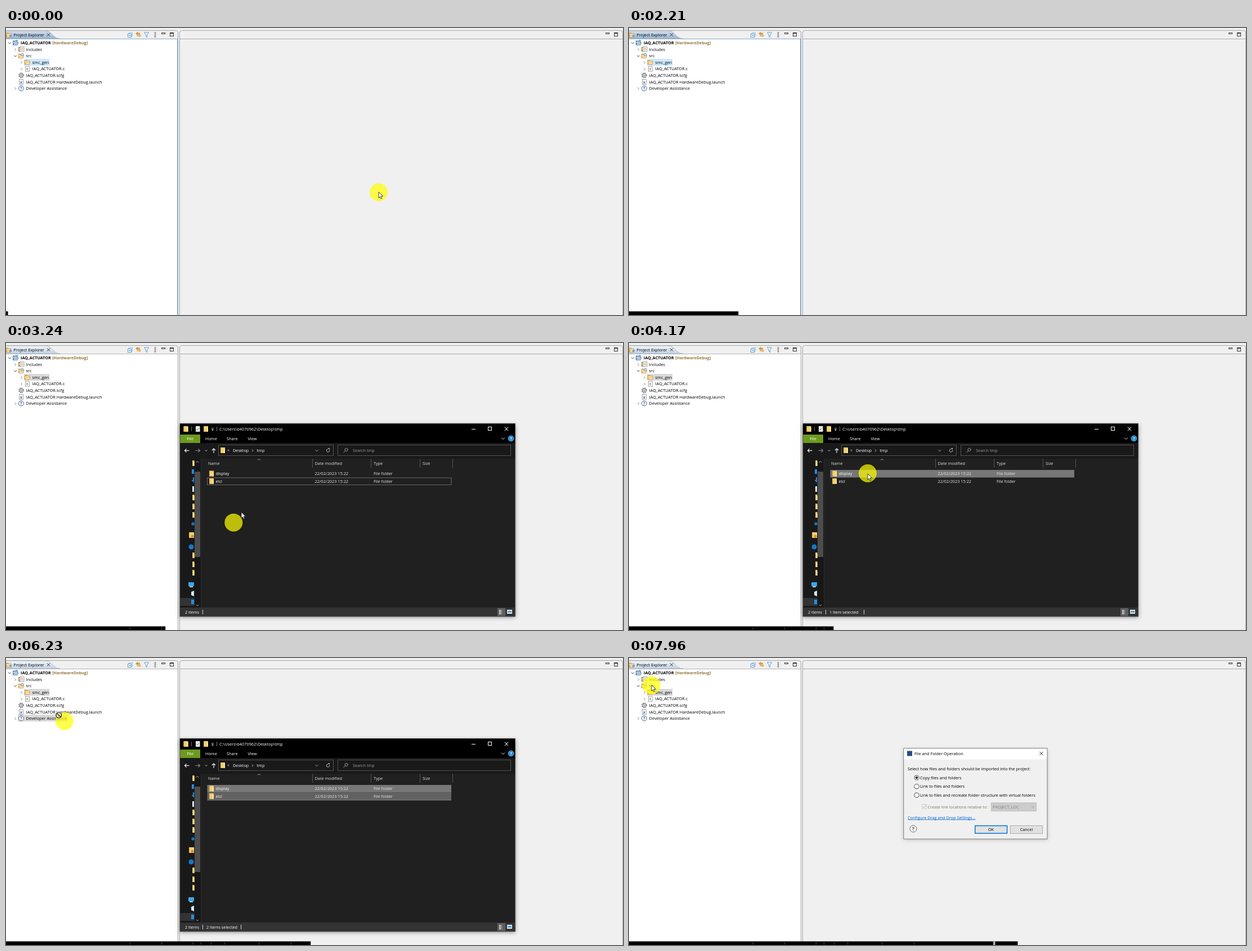
Write an HTML page with a canvas that moves like this. It is 1096x511 px and loops after 7990 ms.

```html
<!DOCTYPE html>
<html lang="en">
<head>
<meta charset="utf-8">
<title>Import folders into a project</title>
<style>
html, body { margin: 0; width: 100%; height: 100%; overflow: hidden; background: #f0f0f0; }
canvas { display: block; width: 1096px; height: 511px; }
</style>
</head>
<body>
<canvas id="stage"></canvas>
<script>
const W = 1096, H = 511, LOOP = 7990;
const FONT = '"Open Sans", "Noto Sans", sans-serif';
const TEXT_SIZE = 7.33, BOLD_SIZE = 7.2;
const WINDOW_FRAME = 2390, WINDOW_READY = 2480;
const PICK_FIRST = 3850, PICK_BOTH = 4500;
const DRAG_START = 5300, DIALOG_OPEN = 7520;
const HALO_LAG = 50;

// pointer path: time, x, y
const PATH = [
  [0, 662, 292.5], [700, 662, 292.5], [780, 638, 293], [1000, 560, 314],
  [1280, 412, 382], [1330, 395, 393], [1480, 330, 430], [1680, 235, 492], [1800, 190, 545],
  [2550, 300, 545], [2800, 345, 470], [3030, 384, 382], [3190, 404, 320], [3240, 418, 302],
  [3450, 424, 262], [3620, 424, 232], [4150, 424, 232], [4350, 424, 245], [4800, 424, 245],
  [5120, 424, 239], [5170, 427, 234], [5400, 425, 232], [5770, 357, 172], [5920, 272, 180],
  [6060, 190, 142], [6180, 104, 112.5], [6230, 93, 101], [6380, 50, 73], [6550, 38, 62],
  [6750, 40, 54], [6900, 40, 48.5]
];

const canvas = document.getElementById('stage');
const ctx = canvas.getContext('2d');
const ratio = window.devicePixelRatio || 1;
canvas.width = W * ratio;
canvas.height = H * ratio;

function pointerAt(t) {
  if (t <= 0) return { x: PATH[0][1], y: PATH[0][2] };
  const i = PATH.findIndex(p => p[0] > t);
  if (i < 0) {
    const end = PATH[PATH.length - 1];
    return { x: end[1], y: end[2] };
  }
  const [t0, x0, y0] = PATH[i - 1], [t1, x1, y1] = PATH[i];
  const k = (t - t0) / (t1 - t0);
  return { x: x0 + (x1 - x0) * k, y: y0 + (y1 - y0) * k };
}

function rect(x, y, w, h, color) {
  ctx.fillStyle = color;
  ctx.fillRect(x, y, w, h);
}

function frame(x, y, w, h, color, width = 1) {
  ctx.strokeStyle = color;
  ctx.lineWidth = width;
  ctx.strokeRect(x, y, w, h);
}

function line(color, width, ...p) {
  ctx.strokeStyle = color;
  ctx.lineWidth = width;
  ctx.beginPath();
  for (let i = 0; i < p.length; i += 2) ctx.lineTo(p[i], p[i + 1]);
  ctx.stroke();
}

function poly(color, ...p) {
  ctx.fillStyle = color;
  ctx.beginPath();
  for (let i = 0; i < p.length; i += 2) ctx.lineTo(p[i], p[i + 1]);
  ctx.closePath();
  ctx.fill();
}

function disc(x, y, r, fill, stroke, width = 1) {
  ctx.beginPath();
  ctx.arc(x, y, r, 0, Math.PI * 2);
  if (fill) { ctx.fillStyle = fill; ctx.fill(); }
  if (stroke) { ctx.strokeStyle = stroke; ctx.lineWidth = width; ctx.stroke(); }
}

// text is placed by its left edge and middle line
function text(str, x, y, color = '#000', weight = 400, size = weight > 400 ? BOLD_SIZE : TEXT_SIZE) {
  ctx.font = `${weight} ${size}px ${FONT}`;
  ctx.fillStyle = color;
  ctx.fillText(str, x, y + 2.6);
  return ctx.measureText(str).width;
}

function centered(str, x, y, color, weight, size) {
  ctx.textAlign = 'center';
  text(str, x, y, color, weight, size);
  ctx.textAlign = 'left';
}

function vertical(y0, y1, top, bottom) {
  const g = ctx.createLinearGradient(0, y0, 0, y1);
  g.addColorStop(0, top);
  g.addColorStop(1, bottom);
  return g;
}

function chevron(x, y, open, color = '#444', s = 2.3) {
  if (open) line(color, 1, x - s, y - s / 2, x, y + s / 2, x + s, y - s / 2);
  else line(color, 1, x - s / 2, y - s, x + s / 2, y, x - s / 2, y + s);
}

function cross(x, y, s, color) {
  line(color, 1, x - s, y - s, x + s, y + s);
  line(color, 1, x + s, y - s, x - s, y + s);
}

function minMax(x, y) {
  frame(x + .5, y + .5, 6, 2, '#444');
  frame(x + 15.5, y + .5, 6, 6, '#333');
  rect(x + 15, y, 7, 2, '#333');
}

function shadowBox(x, y, w, h, color, strength) {
  ctx.save();
  ctx.shadowColor = `rgba(0,0,0,${strength})`;
  ctx.shadowBlur = 7;
  ctx.shadowOffsetY = 1.5;
  rect(x, y, w, h, color);
  ctx.restore();
}

function openFolder(x, y, edge = '#d09a45', fill = '#fde6a8') {
  poly(edge, x - 5, y - 4, x - 1, y - 4, x, y - 3, x + 4, y - 3, x + 4, y + 4, x - 5, y + 4);
  rect(x - 4, y - 2, 7, 4, '#fff6dc');
  poly(edge, x - 5, y + 4, x - 3, y - .5, x + 5.5, y - .5, x + 3.5, y + 4);
  poly(fill, x - 3.7, y + 3.3, x - 2.4, y + .2, x + 4.4, y + .2, x + 3.1, y + 3.3);
}

function page(x, y, letter, color) {
  rect(x - 3.5, y - 4.5, 7, 9, '#fff');
  frame(x - 3.5, y - 4.5, 7, 9, '#8a8f98', .8);
  centered(letter, x, y, color, 700, 6.5);
}

const ICONS = {
  project(x, y) {
    openFolder(x, y, '#4d7fae', '#b9d6f0');
    rect(x, y - 5, 4, 3, '#6c9cc9');
  },
  includes(x, y) {
    openFolder(x, y, '#a98a55', '#f2dfb4');
    page(x + 1.5, y - .5, '', '#777');
    for (let i = 0; i < 3; i++) line('#b8924a', .8, x - .5, y - 2.5 + i * 2, x + 3.5, y - 2.5 + i * 2);
  },
  source(x, y) {
    openFolder(x, y);
    disc(x + 2, y - 2, 2.3, '#cfe0f4', '#4c78ae', .8);
  },
  folder(x, y) { openFolder(x, y); },
  code(x, y) { page(x, y, 'c', '#8a6327'); },
  gear(x, y) {
    ctx.setLineDash([1.7, 1.7]);
    disc(x, y, 4.3, null, '#777', 1.5);
    ctx.setLineDash([]);
    disc(x, y, 3.3, '#e5e5e5', '#777', 1);
    disc(x, y, 1.3, '#fff', '#777', .8);
  },
  launch(x, y) { page(x, y, 'x', '#355f94'); },
  help(x, y) {
    disc(x, y, 4.5, '#fff', '#3b5d8c', 1);
    centered('?', x, y, '#2f4f80', 700, 7);
  }
};

// icon, indent, label, twisty (0 none, 1 closed, 2 open)
const TREE = [
  ['project', 17, 'IAQ_ACTUATOR', 2], ['includes', 27, 'Includes', 1], ['source', 27, 'src', 2],
  ['folder', 38, 'smc_gen', 1], ['code', 38, 'IAQ_ACTUATOR.c', 1], ['gear', 27, 'IAQ_ACTUATOR.scfg', 0],
  ['launch', 27, 'IAQ_ACTUATOR HardwareDebug.launch', 0], ['help', 27, 'Developer Assistance', 1]
];
const SELECTED_ROW = 3, ROW_STEP = 11.57, ROW_TOP = 26.5;

function drawTree(active, hoverRow) {
  TREE.forEach(([icon, x, label, twisty], i) => {
    const y = ROW_TOP + i * ROW_STEP, textX = x + (i ? 8.6 : 9);
    const weight = i ? 400 : 700;
    if (i === SELECTED_ROW || i === hoverRow) {
      ctx.font = `400 ${TEXT_SIZE}px ${FONT}`;
      const right = textX + ctx.measureText(label).width + 1;
      rect(x - 6, Math.round(y - 6), right - x + 6, 12, i === SELECTED_ROW && active ? '#cce8ff' : '#d9d9d9');
    }
    if (twisty) chevron(x - 10.5, y + .3, twisty === 2, twisty === 2 ? '#333' : '#888');
    ICONS[icon](x, y);
    const width = text(label, textX, y, '#000', weight);
    if (!i) text('[HardwareDebug]', textX + width + 2.5, y, '#957c3e', 700);
  });
}

function drawToolbar() {
  frame(218.5, 8.5, 6, 6, '#8dbbe0');
  frame(216.5, 10.5, 6, 6, '#5c9ad0');
  rect(217, 11, 5, 5, '#fff');
  line('#3d7fbd', 1, 218, 13.5, 221.5, 13.5);
  poly('#c99a4a', 230, 10, 234, 6.5, 234, 8.5, 238, 8.5, 238, 11.5, 234, 11.5, 234, 13);
  poly('#e3b96a', 240.5, 13.5, 236.5, 17, 236.5, 15, 232.5, 15, 232.5, 12, 236.5, 12, 236.5, 10);
  poly('#fff', 245.5, 8, 253.5, 8, 250.5, 12, 250.5, 16.5, 248.5, 15, 248.5, 12);
  line('#5f9bc6', 1, 245.5, 8, 253.5, 8, 250.5, 12, 250.5, 16.5, 248.5, 15, 248.5, 12, 245.5, 8);
  for (let i = 0; i < 3; i++) disc(265, 8.6 + i * 3.4, 1.1, '#fff', '#555', .8);
  minMax(276, 8);
}

function panelTop(x0, x1) {
  ctx.beginPath();
  ctx.moveTo(x0, H);
  ctx.lineTo(x0, 8);
  ctx.quadraticCurveTo(x0, 4.5, x0 + 4, 4.5);
  ctx.lineTo(x1 - 4, 4.5);
  ctx.quadraticCurveTo(x1, 4.5, x1, 8);
  ctx.lineTo(x1, H);
  ctx.strokeStyle = '#a5a5a5';
  ctx.lineWidth = 1;
  ctx.stroke();
}

function drawWorkbench(active, hoverRow) {
  rect(0, 0, W, H, '#f0f0f0');
  rect(0, 20, 305, H - 20, '#fff');
  panelTop(-5, 305.5);
  rect(0, 19, 305, 1, active ? '#86a9c9' : '#b4b4b4');
  if (active) rect(304, 19, 2, H - 19, '#86a9c9');

  ctx.beginPath();
  ctx.moveTo(0, 5);
  ctx.lineTo(70, 5);
  ctx.bezierCurveTo(82, 5, 83, 19, 96, 19);
  ctx.lineTo(0, 19);
  ctx.fillStyle = active ? vertical(5, 19, '#d3dfeb', '#99b4d1') : vertical(5, 19, '#f1f5f9', '#c2d2e4');
  ctx.fill();
  ctx.strokeStyle = '#a5b2bf';
  ctx.lineWidth = .8;
  ctx.stroke();
  openFolder(5, 12.5);
  rect(6, 12, 4, 4, '#7ba3cf');
  text('Project Explorer', 13.5, 12);
  cross(75.5, 12, 2.7, '#333');
  drawToolbar();
  drawTree(active, hoverRow);

  panelTop(308.5, 1095.5);
  rect(309, 19, 786, 1, '#a9a9a9');
  minMax(1065, 8);
}

function closedFolder(x, y, w = 8) {
  rect(x, y - 5, w, 10, '#f3cf6d');
  rect(x + w - 2, y - 3, 2, 8, '#ffe9a6');
  rect(x, y - 5, 1, 10, '#d9aa45');
}

function drawNavPane() {
  rect(309, 206, 37, 265, '#191919');
  rect(309, 454, 26, 14, '#333');
  [214, 275, 291, 306, 378, 394, 409].forEach(y => closedFolder(331, y, 3.5));
  rect(330, 225, 4, 8, '#1f8fe5');
  poly('#2490e0', 329.5, 244, 334, 244, 334, 249);
  rect(332, 239, 2, 6, '#2490e0');
  rect(331, 255, 3, 10, '#dfe6ee');
  disc(332, 322, 2.7, '#1478c8');
  closedFolder(325, 342, 9);
  disc(331, 344, 2.5, '#d98b25');
  disc(329, 363, 4.5, '#1478c8');
  rect(324, 426, 10, 7, '#3aa5e8');
  rect(326, 433, 6, 2, '#a9c7da');
  poly('#dbe9f3', 329, 443, 334, 441, 334, 451, 329, 449);
  rect(329, 457, 5, 8, '#1f8fe5');
  rect(335, 206, 10, 265, '#171717');
  rect(335, 229, 10, 152, '#4d4d4d');
  line('#aaa', 1, 337.5, 213, 340, 210.5, 342.5, 213);
  chevron(340, 467, true, '#aaa');
  rect(346, 206, 1, 265, '#2b2b2b');
}

function drawAddressRow() {
  rect(309.5, 178, 595, 28, '#191919');
  for (const [x, dir, color] of [[317.5, 1, '#fff'], [344.5, -1, '#888']]) {
    line(color, 1.1, x, 191.5, x + dir * 8, 191.5);
    line(color, 1.1, x + dir * 3, 188.5, x, 191.5, x + dir * 3, 194.5);
  }
  chevron(355.5, 191.5, true, '#ccc', 2);
  line('#fff', 1.1, 369, 196, 369, 188);
  line('#fff', 1.1, 366, 191, 369, 188, 372, 191);
  frame(377.5, 181.5, 204, 19, '#535353');
  closedFolder(381, 191);
  text('«', 393, 190.5, '#ccc', 400, 8);
  text('Desktop', 403, 191.5, '#fff');
  chevron(438, 191.5, false, '#ccc', 2);
  text('tmp', 445.5, 191.5, '#fff');
  chevron(552, 191.5, true, '#aaa', 2.5);
  ctx.beginPath();
  ctx.arc(572, 191.5, 2.7, -.3, 5);
  ctx.strokeStyle = '#bbb';
  ctx.stroke();
  poly('#bbb', 572, 187, 575, 187, 575, 190);
  frame(589.5, 181.5, 307, 19, '#535353');
  disc(604.5, 190, 2.6, null, '#aaa', .9);
  line('#aaa', .9, 602.5, 192, 599.5, 195);
  text('Search tmp', 616, 191.5, '#9b9b9b');
}

function drawFiles(t, pointer) {
  const picked = t >= PICK_BOTH ? 2 : t >= PICK_FIRST ? 1 : 0;
  const dragging = t >= DRAG_START;
  ['display', 'elcl'].forEach((name, i) => {
    const y = 232.5 + i * 13.5, top = 226 + i * 13.5;
    const inside = pointer.x > 357 && pointer.x < 791 && pointer.y >= top - 3 && pointer.y < top + 13.5;
    const hot = dragging ? i === 0 : inside || (picked === 2 && t > 4900);
    if (i < picked) rect(357.5, top, 433.5, 13.5, hot ? '#777' : '#626262');
    else if (hot) rect(357.5, top, 433.5, 13.5, '#4d4d4d');
    if (i === 1 && !picked) frame(357.5, top + .5, 433.5, 12.5, '#686868');
    closedFolder(361, y);
    text(name, 372.5, y, '#fff');
    text('22/02/2023 15:22', 548.5, y, '#e8e8e8');
    text('File folder', 653, y, '#e8e8e8');
  });
  if (picked === 2) rect(357.5, 252.5, 433.5, 1, '#858585');

  rect(309.5, 471, 595, 16, '#333');
  text('2 items', 318, 479, '#fff');
  rect(349, 475, 1, 8, '#ddd');
  if (picked) {
    text(picked === 2 ? '2 items selected' : '1 item selected', 356, 479, '#fff');
    rect(417, 475, 1, 8, '#ddd');
  }
  rect(873, 472, 14, 14, '#5f5f5f');
  for (let i = 0; i < 3; i++) rect(876, 475.5 + i * 2.8, 3, 1.7, '#eee');
  rect(880, 475, 1, 8, '#aaa');
  rect(890, 475, 9, 7, '#eee');
  rect(891, 477, 7, 3, '#4a9bd0');
}

function drawExplorer(t, pointer) {
  shadowBox(309, 143, 595.5, 344, '#202020', .4);
  rect(309, 143, 595.5, 35, '#000');
  closedFolder(315.5, 153);
  rect(329, 149, 1, 8, '#777');
  rect(337, 148, 7.5, 10, '#eee');
  line('#6c8a55', 1, 338.5, 153, 340, 155, 343, 151);
  closedFolder(351, 153);
  line('#ddd', 1, 365, 152, 369, 152);
  poly('#ddd', 365, 154, 369, 154, 367, 156.5);
  rect(374, 149, 1, 8, '#777');
  text('C:\\Users\\b4070962\\Desktop\\tmp', 379, 153, '#fff');
  line('#fff', 1, 827, 153.5, 834, 153.5);
  frame(856.5, 149.5, 6, 6, '#fff');
  cross(889, 153, 3.3, '#fff');

  if (t >= WINDOW_READY) {
    rect(309, 163, 36, 15, '#6c9a20');
    centered('File', 327, 170.5, '#fff');
    text('Home', 354, 170.5, '#fff');
    text('Share', 392, 170.5, '#fff');
    text('View', 429.5, 170.5, '#fff');
    chevron(883, 170, true, '#ddd', 3);
    disc(897, 170, 5, '#2389d3', '#75b9e9', .8);
    centered('?', 897, 170, '#fff', 700, 7.5);
    drawAddressRow();
    drawNavPane();
    [['Name', 359], ['Date modified', 548.5], ['Type', 653], ['Size', 740]]
      .forEach(([label, x]) => text(label, x, 214, '#dedede'));
    [544, 648, 735, 793].forEach(x => rect(x, 206, 1, 16, '#555'));
    line('#aaa', 1, 447, 208.5, 449.5, 206.5, 452, 208.5);
    drawFiles(t, pointer);
  }
  frame(309, 143.5, 595.5, 343.5, '#4b4b4b', .8);
}

function button(label, x, primary) {
  rect(x, 298, 58, 15, '#e1e1e1');
  if (primary) frame(x + .8, 298.6, 56.8, 13.6, '#0078d7', 1.5);
  else frame(x + .5, 298.5, 57, 14, '#adadad');
  centered(label, x + 29, 305.3);
}

function drawDialog() {
  shadowBox(488, 161, 255, 161, '#f0f0f0', .22);
  rect(488, 161, 255, 19.5, '#fff');
  frame(487.8, 160.8, 255.2, 161.4, '#707070', .9);
  rect(494, 165.5, 9, 9, '#2b4b86');
  text('File and Folder Operation', 507, 170.5);
  cross(732.5, 170, 3, '#222');
  text('Select how files and folders should be imported into the project:', 495, 197);
  ['Copy files and folders', 'Link to files and folders',
    'Link to files and recreate folder structure with virtual folders'].forEach((label, i) => {
    const y = 213 + i * 15.6;
    disc(511, y, 4.1, '#fff', '#333', .9);
    if (!i) disc(511, y, 2.2, '#222');
    text(label, 517, y);
  });
  frame(520.5, 260.5, 8, 8, '#cfcfcf');
  line('#aaa', 1, 522, 264.5, 524, 266.5, 527.5, 262);
  text('Create link locations relative to:', 530.5, 265, '#6f7f5f');
  rect(643, 257.5, 81, 15.5, '#cccccc');
  frame(643.5, 258, 80, 14.5, '#bfbfbf');
  text('PROJECT_LOC', 646, 265.3, '#808080');
  chevron(717.5, 265, true, '#999');
  const width = text('Configure Drag and Drop Settings...', 495, 284, '#0066cc');
  rect(495, 287.5, width, .8, '#0066cc');
  disc(505, 304, 6, '#fafafa', '#666', 1);
  centered('?', 505, 304.3, '#444', 700, 9);
  button('OK', 614, true);
  button('Cancel', 677, false);
}

function drawProgress(t) {
  const width = 3.5 + t * .0863;
  rect(0, 504.5, width, 6.5, '#000');
  [219, 275, 331, 345, 363, 387, 448, 505].forEach(x => {
    if (x + 3 < width) rect(x, 505.5, 3, 4.5, '#1d1d1d');
  });
  if (width > 651) rect(647, 504.5, 3.5, 6.5, '#b5b5b5');
}

function drawPointer(t, tip) {
  const halo = pointerAt(t - HALO_LAG);
  disc(halo.x, halo.y, 16, 'rgba(255,255,0,.7)');
  if (t >= DRAG_START && t < 6420) {
    disc(tip.x + 1, tip.y + 1, 4.9, null, '#fff', 2.6);
    disc(tip.x + 1, tip.y + 1, 4.9, null, '#222', 1.4);
    line('#222', 1.4, tip.x - 2.5, tip.y - 2.5, tip.x + 4.5, tip.y + 4.5);
    return;
  }
  ctx.save();
  ctx.translate(tip.x, tip.y - .5);
  ctx.beginPath();
  [[0, 0], [0, 10.5], [2.4, 8.3], [4, 12], [5.8, 11.2], [4.2, 7.6], [7.5, 7.5]]
    .forEach(p => ctx.lineTo(...p));
  ctx.closePath();
  ctx.fillStyle = '#fff';
  ctx.fill();
  ctx.strokeStyle = '#111';
  ctx.lineWidth = .8;
  ctx.stroke();
  ctx.restore();
}

function dropRow(t, tip) {
  if (t < DRAG_START || t >= DIALOG_OPEN || tip.x > 175) return -1;
  const row = Math.round((tip.y + 1 - ROW_TOP) / ROW_STEP);
  return row < TREE.length ? row : -1;
}

function draw(t) {
  const tip = pointerAt(t);
  ctx.setTransform(ratio, 0, 0, ratio, 0, 0);
  drawWorkbench(t < WINDOW_FRAME, dropRow(t, tip));
  if (t >= DIALOG_OPEN) drawDialog();
  else if (t >= WINDOW_FRAME) drawExplorer(t, tip);
  drawProgress(t);
  drawPointer(t, tip);
}

const start = performance.now();
function tick() {
  draw((performance.now() - start) % LOOP);
  requestAnimationFrame(tick);
}
tick();
</script>
</body>
</html>
```
